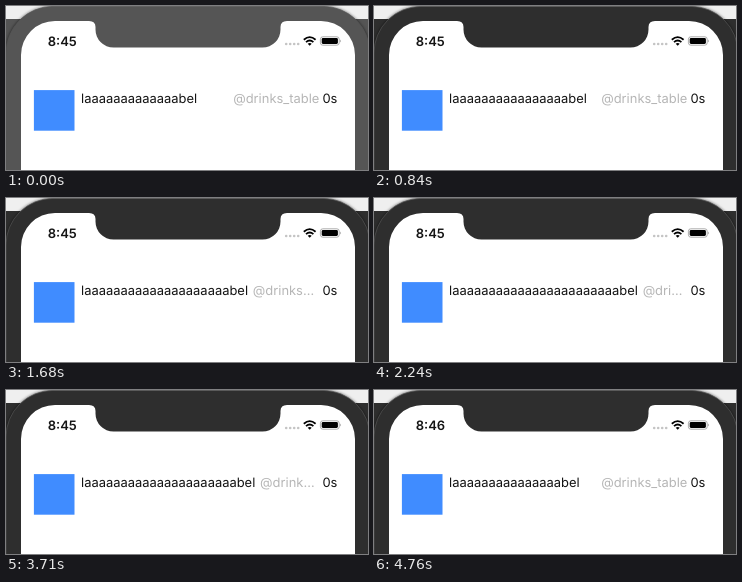
Animation of 362 by 164 pixels, one loop 5.11 s. Source, as an HTML page:

```html
<!DOCTYPE html>
<html lang="en">
<head>
<meta charset="utf-8">
<title>Label compression</title>
<style>
  html, body { margin: 0; width: 100%; height: 100%; overflow: hidden; background: #fff; }
  svg { display: block; width: 362px; height: 164px; }
  text { font-family: Inter, Roboto, sans-serif; font-size: 13px; fill: #141414; text-rendering: geometricPrecision; }
  #clock { font-size: 13px; font-weight: 600; }
  #handle { fill: #b6b6b6; }
  #bezel { stroke: #555; stroke-width: .7; filter: drop-shadow(0 0 1.5px #0009); }
</style>
</head>
<body>
<svg viewBox="0 0 362 164">
  <rect width="362" height="13" fill="#efefef"/>
  <rect id="backdrop" y="13" width="362" height="151"/>
  <path id="bezel" d="M0 166V47A47 46.6 0 0 1 47 .4H317A47 46.6 0 0 1 364 47V166Z"/>
  <path fill="#fff" d="M15 164V49A34 34 0 0 1 49 15H83Q89.5 15 89.5 21V23.5A18 18 0 0 0 107.5 41.5
    H256.5A18 18 0 0 0 274.500 23.5V21Q274.5 15 281 15H315A34 34 0 0 1 349 49V164Z"/>

  <text id="clock" x="41.7" y="39.7"></text>
  <g fill="#c4c4c4">
    <circle cx="280.2" cy="38" r="1.3"/><circle cx="284.2" cy="38" r="1.3"/>
    <circle cx="288.2" cy="38" r="1.3"/><circle cx="292.2" cy="38" r="1.3"/>
  </g>
  <g fill="none" stroke="#000" stroke-width="1.8">
    <path d="M297.8 33.7Q303.7 28.6 309.6 33.7M300 36.2Q303.7 32.9 307.4 36.2"/>
    <path fill="#000" stroke="none" d="M301.7 37.7Q303.7 36.1 305.7 37.7L303.7 39.8Z"/>
  </g>
  <rect x="314.4" y="30.8" width="18.8" height="8.4" rx="2.4" fill="none" stroke="#999" stroke-width=".8"/>
  <rect x="315.7" y="32.1" width="16.2" height="5.8" rx="1.3"/>
  <path fill="#999" d="M334.2 33.6Q336 35 334.2 36.4Z"/>

  <rect x="27.9" y="84.1" width="40.6" height="40.6" fill="#408cff"/>
  <text id="label" x="75" y="97.4"></text>
  <text id="handle" y="97.4"></text>
  <text id="age" x="331.4" y="97.4" text-anchor="end">0s</text>
</svg>
<script>
const LOOP = 5110;
const HANDLE = '@drinks_table';
const LETTER_PITCH = 7.27;
const grow = [280, 560, 840, 980, 1190, 1470, 1680, 1820, 2030, 2240, 2450, 2660];
const shrink = [3150, 3360, 3500, 3710, 3920, 4060, 4270, 4410, 4620, 4760];
// Handle characters left before the ellipsis, from 18 letters upward
const keptChars = [10, 9, 7, 6, 5, 4, 2, 1];

const [clock, label, handle, age, bezel, backdrop] =
  ['clock', 'label', 'handle', 'age', 'bezel', 'backdrop'].map(id => document.getElementById(id));
const passed = (times, t) => times.filter(time => time <= t).length;

// Choose the type size whose letter "a" advances by LETTER_PITCH
label.textContent = 'a'.repeat(20);
const fontSize = 13 * 20 * LETTER_PITCH / label.getComputedTextLength();
for (const text of [label, handle, age]) text.style.fontSize = fontSize + 'px';

let shownCount = 0;

function layout(count) {
  if (count === shownCount) return;
  shownCount = count;
  label.textContent = 'l' + 'a'.repeat(count) + 'bel';
  const kept = keptChars[count - 18];
  handle.textContent = kept ? HANDLE.slice(0, kept) + '…' : HANDLE;
  handle.setAttribute('x', kept ? 75 + label.getComputedTextLength() + 4.8 : 227.2);
}

function draw(now) {
  const t = now % LOOP;
  const shade = t < 70 ? '#555' : t < 140 ? '#404040' : '#2e2e2e';
  bezel.setAttribute('fill', shade);
  backdrop.setAttribute('fill', shade);
  clock.textContent = t < 4760 ? '8:45' : '8:46';
  layout(13 + passed(grow, t) - passed(shrink, t));
}

const start = performance.now();
function tick() {
  draw(performance.now() - start);
  requestAnimationFrame(tick);
}
tick();
</script>
</body>
</html>
```
